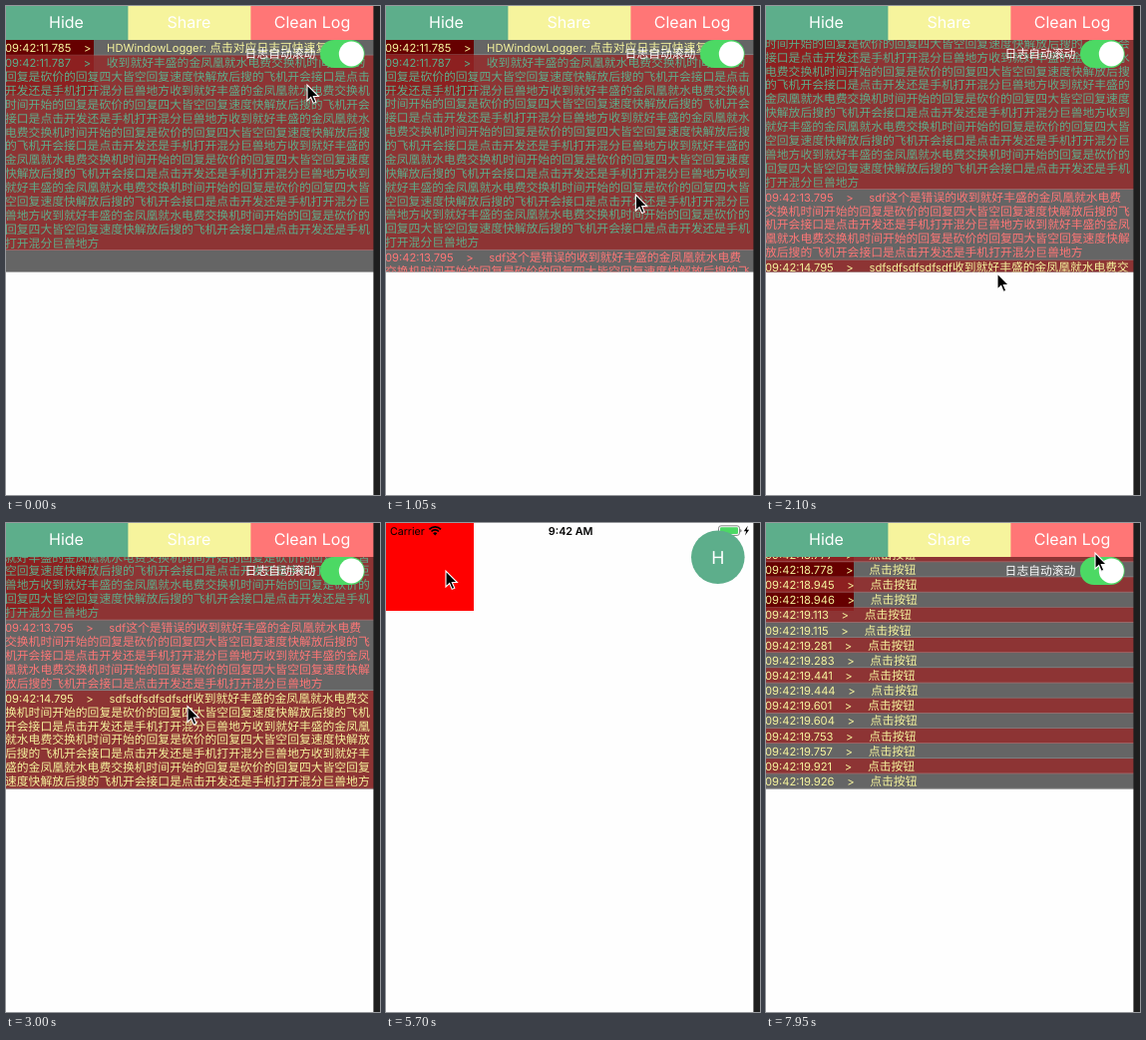
Animation of 375x490 px, one loop 8 s. Source, as an HTML page:

```html
<!DOCTYPE html>
<html lang="zh-CN">
<head>
<meta charset="utf-8">
<title>Window logger</title>
<style>
html, body { margin: 0; width: 100%; height: 100%; overflow: hidden; background: #fefefe; }
svg { display: block; width: 375px; height: 490px; text-rendering: geometricPrecision; }
text { font-family: Inter, "Noto Sans CJK SC", "Noto Sans CJK", sans-serif; font-size: 11.2px; white-space: pre; }
.cjk { font-family: "Noto Sans CJK SC", "Noto Sans CJK", "Noto Sans", sans-serif; font-size: 11.8px; }
.tab { font-size: 16px; fill: #fff; text-anchor: middle; }
</style>
</head>
<body>
<svg viewBox="0 0 375 490">
  <defs><clipPath id="list"><rect y="34" width="369" height="232.6"/></clipPath></defs>
  <rect width="375" height="490" fill="#fefefe"/>
  <rect width="88" height="88" fill="#f00"/>
  <g id="home">
    <text x="4" y="11.7" style="font-size:10.6px">Carrier</text>
    <path d="M43.4 6.3A8.2 8.2 0 0 1 55 6.3M45.5 8.5A5.2 5.2 0 0 1 52.9 8.5" fill="none" stroke="#000" stroke-width="1.7"/>
    <path d="M49.2 12.4L47.1 10.2A3 3 0 0 1 51.3 10.2Z"/>
    <text x="185.2" y="11.7" text-anchor="middle" style="font-size:10.8px;font-weight:600">9:42 AM</text>
    <rect x="333.5" y="2.8" width="21" height="9.6" rx="2.4" fill="none" stroke="#777" stroke-width=".9"/>
    <rect x="335" y="4.3" width="18" height="6.6" rx="1.2" fill="#4cd964"/>
    <path d="M355.2 6v3.4q1.4-.6 1.4-1.7T355.2 6Z" fill="#777"/>
    <path d="M362.8 2.8L358.8 8.3H361.2L360 12.6L364.1 6.8H361.7Z"/>
    <circle cx="332.8" cy="34.2" r="26.8" fill="#5dae8b"/>
    <text x="332.8" y="40.6" text-anchor="middle" fill="#fff" style="font-size:17.7px">H</text>
  </g>
  <g id="logger">
    <rect y="34" width="369" height="232.6" fill="#000" fill-opacity=".6"/>
    <g clip-path="url(#list)"><g id="early"></g><g id="late"></g></g>
    <text class="cjk" x="239.6" y="52.3" fill="#fff">日志自动滚动</text>
    <rect x="315" y="34" width="44.6" height="28" rx="14" fill="#4cd964"/>
    <circle cx="346.3" cy="48" r="12.5" fill="#fff"/>
    <rect width="369" height="34" fill="#ff7676"/>
    <rect width="245.4" height="34" fill="#f6f49d"/>
    <rect width="122.4" height="34" fill="#5dae8b"/>
    <text class="tab" x="60.5" y="22.3">Hide</text>
    <text class="tab" x="183.5" y="22.3">Share</text>
    <text class="tab" x="307" y="22.3">Clean Log</text>
  </g>
  <rect x="368.4" width="7" height="490" fill="#1e1e1e"/>
  <path id="cursor" d="M0 0V16L3.7 12.5L6.2 18.4L8.8 17.3L6.3 11.5H11.4Z" fill="#000" stroke="#fff" stroke-width="1.1"/>
</svg>
<script>
const $ = id => document.getElementById(id);
const LOOP = 8000, STEP = 150;
const TOP = 34.3, BOTTOM = 266.4, LINE = 13.87, PAD = 1.28, PER_LINE = 31;
const THIRD_LOG = 1035, FOURTH_LOG = THIRD_LOG + 1000, CLEAN = 4650, HIDE = 5550, REOPEN = 7800;
const YELLOW = '#f6f49d', GREEN = '#5dae8b', RED = '#ff7676';
const PHRASE = '收到就好丰盛的金凤凰就水电费交换机时间开始的回复是砍价的回复四大皆空' +
  '回复速度快解放后搜的飞机开会接口是点击开发还是手机打开混分巨兽地方';

// Break a message after its first line, then every PER_LINE characters.
function wrap(text, first) {
  const lines = [text.slice(0, first)];
  for (let i = first; i < text.length; i += PER_LINE) lines.push(text.slice(i, i + PER_LINE));
  return lines;
}

const spans = line => line.replace('>', '&gt;')
  .replace(/[^\x20-\x7e]+/g, run => `<tspan class="cjk">${run}</tspan>`);

// Stack rows from y = 0 and return each row's bottom edge.
function buildRows(group, rows, firstShaded) {
  let y = 0;
  const bottoms = [];
  group.innerHTML = rows.map(({ time, text, first = PER_LINE, color = YELLOW }, i) => {
    const lines = wrap(text, first);
    lines[0] = `09:42:${time}    >     ${lines[0]}`;
    const height = lines.length * LINE + PAD;
    const shade = i % 2 === firstShaded
      ? `<rect y="${y}" width="369" height="${height}" fill="rgba(152,40,40,.8)"/>` : '';
    const body = lines.map((line, n) =>
      `<text x="-1" y="${y + PAD / 2 + LINE * (n + .5) + 4.2}">${spans(line)}</text>`).join('');
    y += height;
    bottoms.push(y);
    const rule = `<rect y="${y - .6}" width="369" height=".6" fill="#c8c7cc" fill-opacity=".5"/>`;
    return `<g fill="${color}">${shade}${body}${rule}</g>`;
  }).join('');
  return bottoms;
}

const early = buildRows($('early'), [
  { time: '11.785', text: 'HDWindowLogger: 点击对应日志可快速复制' },
  { time: '11.787', text: PHRASE.repeat(6), first: 22, color: GREEN },
  { time: '13.795', text: 'sdf这个是错误的' + PHRASE.repeat(2), first: 23, color: RED },
  { time: '14.795', text: 'sdf'.repeat(5) + PHRASE.repeat(3), first: 30 }
], 1);

// Each tap logs twice, the second entry a few milliseconds later.
const taps = '18.777 18.945 19.113 19.281 19.441 19.601 19.753 19.921'.split(' ');
const late = buildRows($('late'), taps.flatMap((time, i) => {
  const lag = Math.floor(1.1 + .56 * i) / 1000;
  return [time, (+time + lag).toFixed(3)].map(time => ({ time, text: '点击按钮' }));
}), 0);
$('late').setAttribute('transform', `translate(0 ${BOTTOM - late.at(-1)})`);

function ease(t, from, to) {
  const u = Math.min(1, Math.max(0, (t - from) / (to - from)));
  return u * u * (3 - 2 * u);
}

// Pointer moves: start, end, destination.
const moves = [
  [0, 750, 247, 186], [750, 1650, 260, 198], [1800, 2100, 232, 268],
  [2700, 3450, 90, 28], [3450, 3750, 298, 22], [3750, 4500, 320, 15],
  [CLEAN, 5100, 55, 22], [HIDE, 5700, 60, 48], [7050, 7650, 330, 30]
];

function pointer(t) {
  let x = 302, y = 79;
  for (const [from, to, toX, toY] of moves) {
    const u = ease(t, from, to);
    x += (toX - x) * u;
    y += (toY - y) * u;
  }
  return [x, y];
}

// The list is pulled down once and springs back within a second.
const pull = t => t < 1000 ? 18 * Math.sin(Math.PI * t / 1000) ** 4 : 0;

function scrollY(t) {
  const third = BOTTOM - TOP - early[2];
  const fourth = early[2] - early[3];
  return TOP + pull(t) + third * ease(t, THIRD_LOG, THIRD_LOG + 300)
    + fourth * ease(t, FOURTH_LOG, FOURTH_LOG + 300);
}

const show = (el, on) => el.setAttribute('visibility', on ? 'inherit' : 'hidden');
const place = (el, x, y) => el.setAttribute('transform', `translate(${x} ${y})`);

function render(now) {
  const t = Math.floor(now % LOOP / STEP) * STEP;
  const open = t < HIDE || t >= REOPEN;
  show($('home'), !open);
  show($('logger'), open);
  show($('early'), t < CLEAN);
  show($('late'), t >= REOPEN);
  show($('early').children[2], t >= THIRD_LOG);
  show($('early').children[3], t >= FOURTH_LOG);
  place($('early'), 0, scrollY(t));
  place($('cursor'), ...pointer(t));
}

const begin = performance.now();
function tick() {
  render(performance.now() - begin);
  requestAnimationFrame(tick);
}
tick();
</script>
</body>
</html>
```
